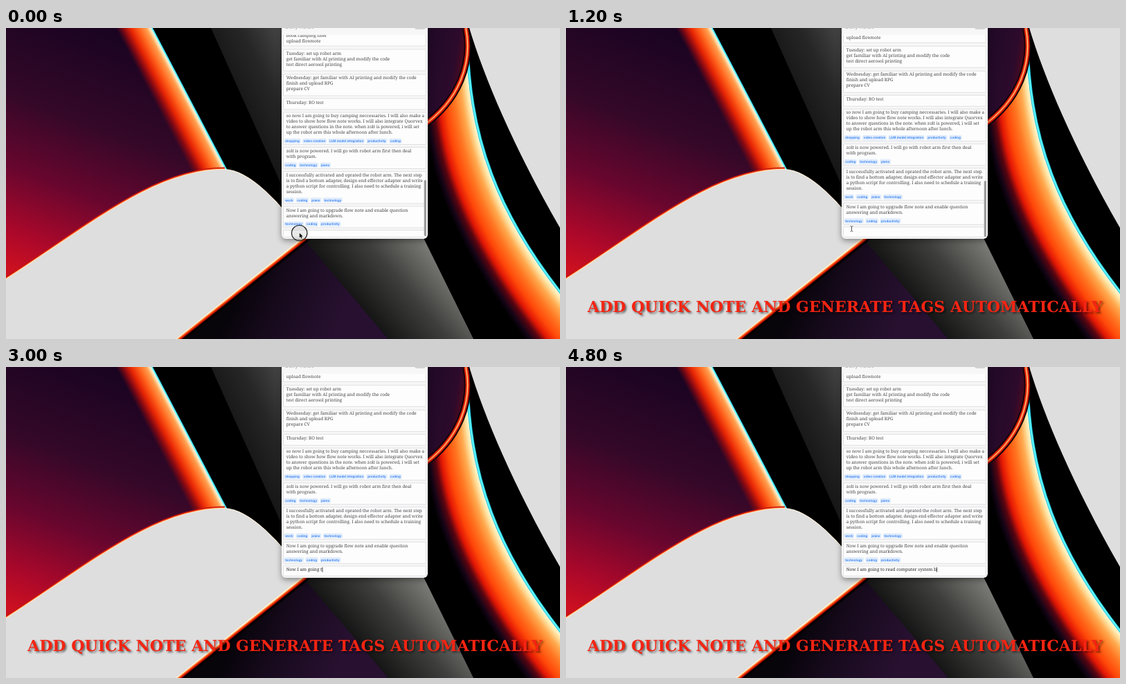
Write an HTML page with a canvas that moves like this. It is 800 px wide and 450 px high and loops after 5000 ms.

```html
<!DOCTYPE html>
<html lang="en">
<head>
<meta charset="utf-8">
<title>Quick note</title>
<style>
html, body { margin: 0; width: 100%; height: 100%; overflow: hidden; background: #dedede; }
canvas { display: block; width: 800px; height: 450px; }
</style>
</head>
<body>
<canvas id="stage" width="800" height="450"></canvas>
<script>
const W = 800, H = 450, LOOP = 5000, STEP = 200;
const SERIF = '"Noto Serif", "Liberation Serif", serif';
const SLAB = '"DejaVu Serif", "Noto Serif", serif';
const ctx = document.getElementById('stage').getContext('2d');
const lerp = (a, b, k) => a + (b - a) * k;

// ---------- wallpaper ----------
function linear(g, x0, y0, x1, y1, stops) {
  const grad = g.createLinearGradient(x0, y0, x1, y1);
  stops.forEach(([p, c]) => grad.addColorStop(p, c));
  return grad;
}

function fill(g, path, style) {
  g.fillStyle = style;
  g.fill(new Path2D(path));
}

function edge(g, path, layers) {
  const p = new Path2D(path);
  layers.forEach(([width, color]) => {
    g.lineWidth = width;
    g.strokeStyle = color;
    g.stroke(p);
  });
}

function ramp(stops, s) {
  const i = Math.max(1, stops.findIndex(([p]) => p >= s));
  const [p0, c0] = stops[i - 1], [p1, c1] = stops[i];
  const k = (s - p0) / (p1 - p0);
  return `rgb(${c0.map((v, j) => Math.round(lerp(v, c1[j], k)))})`;
}

// Shades the area between two cubic curves
function ribbon(g, a, b, stops) {
  const n = 160;
  for (let i = 0; i < n; i++) {
    const c = a.map((v, j) => lerp(v, b[j], i / n));
    g.beginPath();
    g.moveTo(c[0], c[1]);
    g.bezierCurveTo(...c.slice(2));
    g.lineTo(b[6], b[7]);
    g.bezierCurveTo(b[4], b[5], b[2], b[3], b[0], b[1]);
    g.fillStyle = ramp(stops, i / n);
    g.fill();
  }
}

function paintWallpaper() {
  const cv = document.createElement('canvas');
  cv.width = W;
  cv.height = H;
  const g = cv.getContext('2d');
  fill(g, 'M0 0H800V450H0Z', '#dedede');

  // right: black field, glowing ribbon, disc
  fill(g, 'M590 0H669C692 76 737 182 812 310V460H590Z', '#000');
  ribbon(g, [604, 132, 612, 225, 650, 325, 785, 500], [666, 18, 670, 140, 695, 270, 846, 436], [
    [0, [0, 0, 0]], [.1, [22, 6, 24]], [.22, [90, 6, 18]], [.33, [226, 24, 6]], [.46, [255, 72, 10]],
    [.64, [255, 118, 34]], [.8, [255, 170, 80]], [.92, [255, 232, 170]], [1, [255, 255, 240]]
  ]);
  edge(g, 'M666 18C670 140 695 270 846 436', [[4, '#12b8d0'], [2.4, '#5ff4ff']]);
  const rim = 'M664 0C674 50 655 105 600 143';
  fill(g, rim + 'V0Z', linear(g, 600, 60, 664, 70, [[0, '#200a26'], [.7, '#2c0a2c'], [1, '#5a0a18']]));
  edge(g, rim, [[10, '#12040a'], [6, '#d81c0a'], [2.6, '#ff6a2a'], [1, '#ffc890']]);

  // centre
  fill(g, 'M205 0H600V300L603 305L675 450H230V300L330 240Z', '#000');
  fill(g, 'M296 0H400V232Z', linear(g, 312, 70, 410, 20, [[0, '#151515'], [.5, '#262626'], [1, '#474747']]));
  fill(g, 'M430 300L552 450H240Z', linear(g, 330, 390, 470, 450, [[0, '#07040a'], [.4, '#170a1c'], [1, '#271030']]));
  fill(g, 'M425 300H601L675 450H552Z', linear(g, 490, 375, 590, 290, [
    [0, '#161616'], [.5, '#3e3e3c'], [.75, '#5e5e5b'], [1, '#7c7c78']
  ]));

  // left panel
  const panel = 'M0 0H212L320 206C260 208 180 250 0 366Z';
  fill(g, panel, linear(g, 140, 10, 10, 350, [
    [0, '#1b0422'], [.35, '#340828'], [.62, '#68062e'], [.86, '#ac082a'], [1, '#cc1020']
  ]));
  fill(g, panel, linear(g, 224, 125, 266, 103, [
    [0, 'rgba(120,8,20,0)'], [.2, '#8c0a12'], [.38, '#e62404'], [.6, '#ff601a'],
    [.82, '#ffa050'], [.93, '#fff0cc'], [.97, '#6ff4ff'], [1, '#10c4d8']
  ]));

  // pale lobe with a hot rim
  const top = 'M0 364C120 287 215 205 316 205', side = 'C350 206 400 255 428 303';
  edge(g, top, [[7, '#c01010'], [4.5, '#ff5a1c'], [2.5, '#ffe6c0']]);
  edge(g, 'M316 205' + side, [[2, '#fff3dc']]);
  edge(g, 'M432 301L235 458', [[17, '#000'], [11, '#a80c04'], [8, '#f43408'], [5, '#ff8a3c'], [2.5, '#fff0d0']]);
  fill(g, top + side + 'L245 450H0Z', '#dedede');
  return cv;
}

// ---------- notes ----------
const NOTES = [
  { y: -10, h: 36, text: 10.5, lines: ['book camping sites', 'upload flownote'] },
  { y: 31, h: 31, text: 37, lines: ['Tuesday: set up robot arm', 'get familiar with AI printing and modify the code', 'test direct aerosol printing'] },
  { y: 67, h: 31, text: 72, lines: ['Wednesday: get familiar with AI printing and modify the code', 'finish and upload RPG', 'prepare CV'] },
  { y: 102, h: 16, text: 107.5, lines: ['Thursday: BO test'] },
  { y: 122, h: 46.5, text: 127, tagY: 163.5,
    lines: ['so now I am going to buy camping neccessaries. I will also make a', 'video to show how flow note works. I will also integrate Quorvex', 'to answer questions in the note. when zolt is powered, i will set', 'up the robot arm this whole afternoon after lunch.'],
    tags: ['shopping', 'video creation', 'LLM model integration', 'productivity', 'coding'] },
  { y: 172.5, h: 31, text: 178, tagY: 198.3,
    lines: ['zolt is now powered. I will go with robot arm first then deal', 'with program.'],
    tags: ['coding', 'technology', 'piano'] },
  { y: 207.5, h: 46.5, text: 212.5, tagY: 249,
    lines: ['I successfully activated and oprated the robot arm. The next step', 'is to find a bottom adapter, design end effector adapter and write', 'a python script for controlling. I also need to schedule a training', 'session.'],
    tags: ['work', 'coding', 'piano', 'technology'] },
  { y: 258, h: 31, text: 263.5, tagY: 283.8,
    lines: ['Now I am going to upgrade flow note and enable question', 'answering and markdown.'],
    tags: ['technology', 'coding', 'productivity'] }
];
const TYPED = 'Now I am going to read computer system b';
const KEYS = [[1800, 0], [2200, 5], [3000, 16], [3600, 23], [4800, 40]];

function box(x, y, w, h, r, color) {
  ctx.beginPath();
  ctx.roundRect(x, y, w, h, r);
  ctx.fillStyle = color;
  ctx.fill();
}

function card(y, h) {
  box(400.5, y, 206, h, 1, '#fdfdfd');
  ctx.lineWidth = .7;
  ctx.strokeStyle = '#d6d6d8';
  ctx.stroke();
}

function say(text, x, y, color) {
  ctx.font = `6.38px ${SERIF}`;
  ctx.fillStyle = color;
  ctx.fillText(text, x, y + 2);
}

function drawTags(tags, y) {
  ctx.font = '600 4.55px Inter, sans-serif';
  let x = 403.3;
  for (const tag of tags) {
    const w = ctx.measureText(tag).width;
    box(x - 1.8, y - 3.8, w + 3.6, 7.4, 2, '#e1edfc');
    ctx.fillStyle = '#2f7bf0';
    ctx.fillText(tag, x, y + 1.5);
    x += w + 6;
  }
}

function typedCount(t) {
  const i = KEYS.findIndex(([at]) => at >= t);
  if (i < 1) return 0;
  const [t0, n0] = KEYS[i - 1], [t1, n1] = KEYS[i];
  return Math.round(lerp(n0, n1, (t - t0) / (t1 - t0)));
}

function drawWindow(t) {
  const focused = t >= 1000, dy = focused ? -4.7 : 0;
  ctx.save();
  ctx.shadowColor = 'rgba(0,0,0,.4)';
  ctx.shadowBlur = 8;
  ctx.shadowOffsetY = 3;
  box(398, -20, 211, 325, 6, '#f7f7f8');
  ctx.restore();

  ctx.save();
  ctx.beginPath();
  ctx.rect(398, 10, 211, 294);
  ctx.clip();
  for (const n of NOTES) {
    card(n.y + dy, n.h);
    n.lines.forEach((s, i) => say(s, 404.7, n.text + dy + i * 8, '#454545'));
    if (n.tags) drawTags(n.tags, n.tagY + dy);
  }
  const top = focused ? 288 : 292.5;
  card(top, 302.5 - top);
  if (t >= 1800) {
    const typed = TYPED.slice(0, typedCount(t));
    say(typed, 404.7, 293, '#222');
    box(405 + ctx.measureText(typed).width, 289.8, .8, 7, 0, '#111');
  }
  ctx.restore();

  ctx.font = '8px Inter, sans-serif';
  ctx.fillStyle = '#aaa';
  ctx.fillText('Daily notes', 403, .8);
  box(590, -8, 16, 10, 3, '#d2d2d4');
  if (t < 1800) box(603.7, focused ? 221 : 220, 3.2, 81, 1.6, '#9b9b9d');
}

// ---------- pointer ----------
function drawArrow(x, y) {
  const p = new Path2D(`M${x} ${y}v6.6l1.6 -1.5l1.1 2.6l1.2 -.5l-1.1 -2.5h2.2z`);
  ctx.lineWidth = 1;
  ctx.strokeStyle = '#fff';
  ctx.stroke(p);
  ctx.fillStyle = '#000';
  ctx.fill(p);
}

function drawBeam(x, y) {
  const p = new Path2D(`M${x - 2} ${y - 4}q2 0 2 1.5v5q0 1.5 -2 1.5M${x + 2} ${y - 4}q-2 0 -2 1.5v5q0 1.5 2 1.5`);
  ctx.lineWidth = .7;
  ctx.strokeStyle = '#444';
  ctx.stroke(p);
}

function drawPointer(t) {
  if (t < 200) {
    ctx.beginPath();
    ctx.arc(423.7, 296.7, 11.2, 0, Math.PI * 2);
    ctx.fillStyle = 'rgba(150,150,150,.18)';
    ctx.fill();
    ctx.lineWidth = 1.2;
    ctx.strokeStyle = '#1c1c1c';
    ctx.stroke();
    drawArrow(423.8, 296.8);
  } else if (t < 1000) {
    const k = Math.min(1, t / 800);
    drawBeam(lerp(424, 436, k), lerp(297, 299, k));
  } else if (t < 2000) {
    const k = Math.min(1, (t - 800) / 400);
    drawBeam(lerp(436, 412.5, k), lerp(299, 290.5, k));
  }
}

// ---------- headline ----------
const TITLE = 'ADD QUICK NOTE AND GENERATE TAGS AUTOMATICALLY';

// Letters rise one after another, slowing as they settle
function drawTitle(t) {
  const front = -9 + t * .0525;
  ctx.save();
  ctx.font = `700 22.1px ${SLAB}`;
  ctx.fillStyle = '#f42412';
  ctx.shadowColor = 'rgba(0,0,0,.55)';
  ctx.shadowBlur = 3;
  ctx.shadowOffsetX = 2;
  ctx.shadowOffsetY = 2.5;
  for (let i = 0; i < TITLE.length; i++) {
    const lag = Math.max(0, i - front);
    if (lag >= 9) break;
    const w = ctx.measureText(TITLE[i]).width;
    const x = 31 + ctx.measureText(TITLE.slice(0, i + 1)).width - w;
    ctx.save();
    ctx.translate(x + w / 2, 402 + .72 * lag * lag);
    ctx.rotate(lag * .028);
    ctx.fillText(TITLE[i], -w / 2, 8.5);
    ctx.restore();
  }
  ctx.restore();
}

const wallpaper = paintWallpaper();
ctx.textRendering = 'geometricPrecision';
const start = performance.now();

function draw() {
  const now = (performance.now() - start) % LOOP;
  const t = Math.floor(now / STEP) * STEP;
  ctx.drawImage(wallpaper, 0, 0);
  drawWindow(t);
  drawPointer(t);
  drawTitle(t);
  requestAnimationFrame(draw);
}
draw();
</script>
</body>
</html>
```
